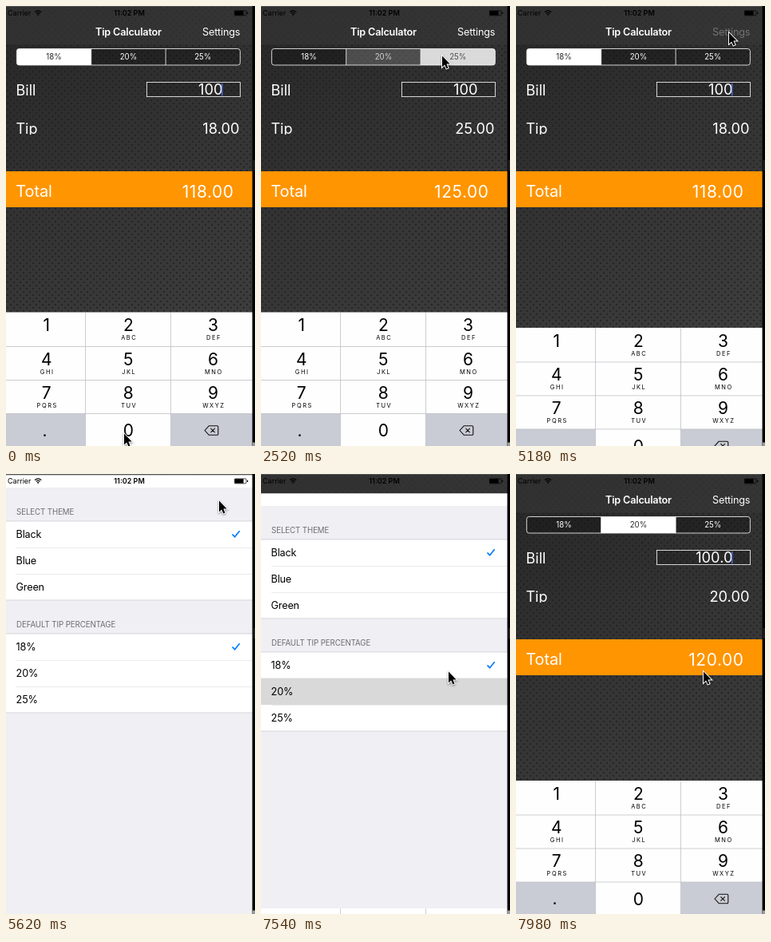
An HTML page that plays this animation: 312 px wide and 551 px high, repeating every 8 s.

```html
<!DOCTYPE html>
<html lang="en">
<head>
<meta charset="utf-8">
<title>Tip Calculator</title>
<style>
  html, body { margin: 0; width: 100%; height: 100%; overflow: hidden; background: #000; }
  svg { display: block; width: 312px; height: 551px; font-family: Inter, "Open Sans", sans-serif; }
  .body { font-size: 12.7px; letter-spacing: -.2px; }
  .bold { font-weight: 600; }
  .small { font-size: 9.7px; }
  .status { font-size: 9px; }
  .label { font-size: 18px; }
  .value { font-size: 18.3px; }
  .total { font-size: 20.9px; letter-spacing: .6px; }
  .head { font-size: 9.7px; letter-spacing: -.08px; fill: #6d6d72; }
  .digit { font-size: 21px; }
  .letters { font-size: 7.5px; letter-spacing: 1.5px; }
  .mid { text-anchor: middle; }
  .end { text-anchor: end; }
  #cursor { stroke: #fff; stroke-width: 2; paint-order: stroke; filter: drop-shadow(0 1px 1px rgba(0, 0, 0, .45)); }
</style>
</head>
<body>
<svg id="stage" viewBox="0 0 312 551"></svg>
<script>
const LOOP = 8000, STEP = 147.85;

// [step, x, y]
const CURSOR = [
  [1, 148, 535], [2, 148, 480], [3, 150, 330], [4, 152, 180], [5, 154, 90], [6, 155, 62],
  [9, 155, 62], [10, 168, 62], [11, 198, 62], [12, 220, 62], [13, 227, 62],
  [17, 227, 62], [18, 215, 62], [19, 180, 62], [20, 140, 62], [21, 110, 62], [23, 94, 62],
  [25, 94, 62], [26, 140, 60], [27, 197, 53], [28, 235, 44], [29, 256, 36], [31, 267, 33],
  [38, 267, 33], [39, 263, 75], [40, 255, 134], [41, 249, 175], [42, 243, 212], [43, 239, 235], [46, 235, 247]
];
// [step, how far the settings sheet is open]
const SHEET = [
  [34, 0], [35, .116], [36, .66], [37, .95], [38, 1],
  [50, 1], [51, .9583], [52, .42], [53, .08], [54, .003]
];
// [first step, selected segment]
const PICKS = [[-3, 0], [8, 1], [17, 2], [25, 0], [51, 1]];
const RATES = [18, 20, 25];
const SEGMENT = { x: 13.3, width: 93.4 };

const text = (x, y, cls, str, extra = '') => `<text x="${x}" y="${y}" class="${cls}" ${extra}>${str}</text>`;
const rect = (x, y, w, h, fill, extra = '') =>
  `<rect x="${x}" y="${y}" width="${w}" height="${h}" fill="${fill}" ${extra}/>`;

function calculator() {
  const left = i => SEGMENT.x + SEGMENT.width * i;
  const segments = RATES.map((rate, i) =>
    rect(left(i), 53.5, SEGMENT.width, 20.5, '#fff', 'class="segment" clip-path="url(#pill)"') +
    text(left(i + .5), 67, 'small mid rate', rate + '%')).join('');
  return `
    ${rect(0, 0, 309, 551, 'url(#metal)')}${rect(0, 0, 309, 551, 'url(#holes)')}
    ${rect(0, 0, 309, 48.5, '#3a3a3a', 'opacity=".55"')}
    <g fill="#fff">
      ${text(153.5, 37.3, 'body bold mid', 'Tip Calculator')}
      ${text(293.3, 37.3, 'body end', 'Settings', 'id="settings"')}
      ${rect(13.4, 53.5, 280, 20.5, '#000', 'rx="3" opacity=".25"')}
      ${segments}
      <path d="M${left(1)} 53.5v20.5M${left(2)} 53.5v20.5" stroke="#fff" stroke-width=".8"/>
      ${rect(13.4, 53.5, 280, 20.5, 'none', 'rx="3" stroke="#fff" stroke-width=".8"')}
      ${text(12.5, 111.7, 'label', 'Bill')}
      ${rect(176.4, 95.4, 117.2, 18.2, '#000', 'fill-opacity=".15" stroke="#fff" stroke-width=".8"')}
      ${text(271.5, 111.3, 'value end', '100', 'id="bill"')}
      ${rect(270, 97, 1.5, 15.5, '#4a6be0', 'id="caret"')}
      <g clip-path="url(#tipBox)">${text(12.5, 159.7, 'label', 'Tip')}</g>
      ${text(292.5, 160, 'value end', '', 'id="tip"')}
      ${rect(0, 207, 309, 45, '#ff9500')}
      ${text(12.3, 238.5, 'label', 'Total', 'style="font-size:20px;letter-spacing:-.1px"')}
      ${text(285.6, 240, 'total end', '', 'id="total"')}
    </g>`;
}

function sheet() {
  const check = y => `<path d="M283.5 ${y}l3.2 3.2 6-7.4" fill="none" stroke="#007aff" stroke-width="1.7"/>`;
  const border = y => rect(0, y - .4, 309, .7, '#c8c7cc');
  const section = (top, title, rows, pressed = '') =>
    text(13, top - 8, 'head', title) + rect(0, top, 309, 99, '#fff') +
    rect(13, top + 33, 296, .6, '#dedde1') + rect(13, top + 66, 296, .6, '#dedde1') + pressed +
    rows.map((row, i) => text(12.6, top + 33 * i + 20.8, 'body', row)).join('') +
    check(top + 16.5) + border(top) + border(top + 99);
  return rect(0, 1.5, 309, 550, '#efeff4') + rect(0, 1.5, 309, 15.5, '#fff') +
    section(59, 'SELECT THEME', ['Black', 'Blue', 'Green']) +
    section(200, 'DEFAULT TIP PERCENTAGE', RATES.map(r => r + '%'),
      rect(0, 232.6, 309, 33.4, '#d9d9d9', 'id="pressed"'));
}

function keyboard() {
  const columns = [50.8, 153.3, 259.5], letters = ['', 'ABC', 'DEF', 'GHI', 'JKL', 'MNO', 'PQRS', 'TUV', 'WXYZ'];
  const keys = letters.map((str, i) => {
    const x = columns[i % 3], y = 407.3 + 42.3 * Math.floor(i / 3);
    return text(x, y, 'digit mid', i + 1) + text(x + .9, y + 10.9, 'letters mid', str);
  }).join('');
  return `
    ${rect(0, 383.5, 309, 168, '#fefefe')}
    ${rect(0, 510.5, 99.5, 41, '#c9ccd4')}${rect(206.5, 510.5, 102.5, 41, '#c9ccd4')}
    <path d="M0 426.5H309M0 468.5H309M0 510.5H309M99.5 384V551M206.5 384V551" stroke="#bfc1c5" stroke-width=".8"/>
    ${keys}${text(columns[1], 539.3, 'digit mid', '0')}${text(48.5, 538.5, 'digit mid', '.')}
    <path d="M249 531.5l5.2-5.7h10.3q1.3 0 1.3 1.3v8.8q0 1.3-1.3 1.3h-10.3zM256.4 528.8l5.4 5.4m0-5.4l-5.4 5.4"
      fill="none" stroke="#111" stroke-width="1.1" stroke-linejoin="round"/>`;
}

const statusBar = `
  ${text(2, 12, 'status', 'Carrier')}${text(154.5, 12, 'status bold mid', '11:02 PM')}
  <path d="M36 7.6q4.2-3.6 8.4 0M37.6 9.4q2.6-2.2 5.2 0" fill="none" stroke="#000" stroke-width="1.2"/>
  <path d="M38.8 10.6q1.4-1 2.8 0l-1.4 1.6z"/>
  ${rect(286.4, 5.9, 14.6, 6, 'none', 'rx="1" stroke="#000" stroke-width=".7"')}
  ${rect(286.6, 6.2, 11, 5.4, '#000')}${rect(302, 7.8, 1.2, 2.2, '#000')}`;

const screenEdge = rect(0, 0, 312, 1, '#555') + rect(308.6, 0, 3.4, 551, '#000') +
  rect(309.5, 193, 2.5, 13, '#1c1c1c') + rect(309, 546.5, 3, 4.5, '#999');

const $ = id => document.getElementById(id);
$('stage').innerHTML = `
  <defs>
    <linearGradient id="metal" x1="0" y1="0" x2=".35" y2="1">
      <stop offset="0" stop-color="#272727"/><stop offset=".5" stop-color="#343434"/><stop offset="1" stop-color="#3e3e3e"/>
    </linearGradient>
    <pattern id="holes" width="8" height="8" patternUnits="userSpaceOnUse">
      <g fill="#1d1d1d" opacity=".65"><circle cx="2" cy="2" r="1.3"/><circle cx="6" cy="6" r="1.3"/></g>
    </pattern>
    <clipPath id="pill"><rect x="13.4" y="53.5" width="280" height="20.5" rx="3"/></clipPath>
    <clipPath id="tipBox"><rect x="0" y="140" width="60" height="21"/></clipPath>
  </defs>
  <g>${calculator()}</g>
  <g id="sheet">${sheet()}</g>
  <g id="keyboard">${keyboard()}</g>
  ${statusBar}
  ${screenEdge}
  <path id="cursor" d="M0 .6V14.4L3.2 11.4 5.4 16.4 7.5 15.5 5.4 10.6H9.7Z"/>`;

const segments = [...document.querySelectorAll('.segment')];
const rates = [...document.querySelectorAll('.rate')];

function along(keys, step) {
  const next = keys.findIndex(key => key[0] > step);
  if (next === 0) return keys[0].slice(1);
  if (next < 0) return keys[keys.length - 1].slice(1);
  const a = keys[next - 1], b = keys[next], k = (step - a[0]) / (b[0] - a[0]);
  return a.slice(1).map((v, i) => v + (b[i + 1] - v) * k);
}

// White level of each segment: touch-down tint, cross-fade, settled
function segmentLevels(step, now) {
  const [since, chosen] = PICKS[now], before = now ? PICKS[now - 1][1] : chosen;
  const fading = step === since && since < 51;
  const levels = [0, 0, 0];
  levels[before] = fading ? .2 : 0;
  levels[chosen] = fading ? .83 : 1;
  const next = PICKS[now + 1];
  if (next && next[0] < 51 && step === next[0] - 1) levels[next[1]] = .2;
  return levels;
}

function draw(time) {
  const step = Math.floor((time + 5) / STEP);
  const now = PICKS.filter(pick => pick[0] <= step).length - 1;
  const rate = RATES[PICKS[now][1]];

  segmentLevels(step, now).forEach((level, i) => {
    const ink = Math.round(255 - 215 * level);
    segments[i].setAttribute('opacity', level);
    rates[i].setAttribute('fill', `rgb(${ink},${ink},${ink})`);
  });
  $('tip').textContent = rate.toFixed(2);
  $('total').textContent = (100 + rate).toFixed(2);
  $('bill').textContent = step < 51 ? '100' : '100.0';
  $('caret').setAttribute('opacity', (step * STEP + 100) % 1000 < 500 ? 1 : 0);
  $('settings').setAttribute('opacity', step >= 33 && step < 51 ? .3 : 1);
  $('pressed').setAttribute('opacity', step < 51 ? 0 : 1);

  const [open] = along(SHEET, step);
  $('sheet').setAttribute('transform', `translate(0 ${Math.round(551 * (1 - open))})`);
  $('keyboard').setAttribute('transform', `translate(0 ${167.5 * open})`);
  const [x, y] = along(CURSOR, step);
  $('cursor').setAttribute('transform', `translate(${x} ${y})`);
}

const start = performance.now();
function tick() {
  draw((performance.now() - start) % LOOP);
  requestAnimationFrame(tick);
}
tick();
</script>
</body>
</html>
```
